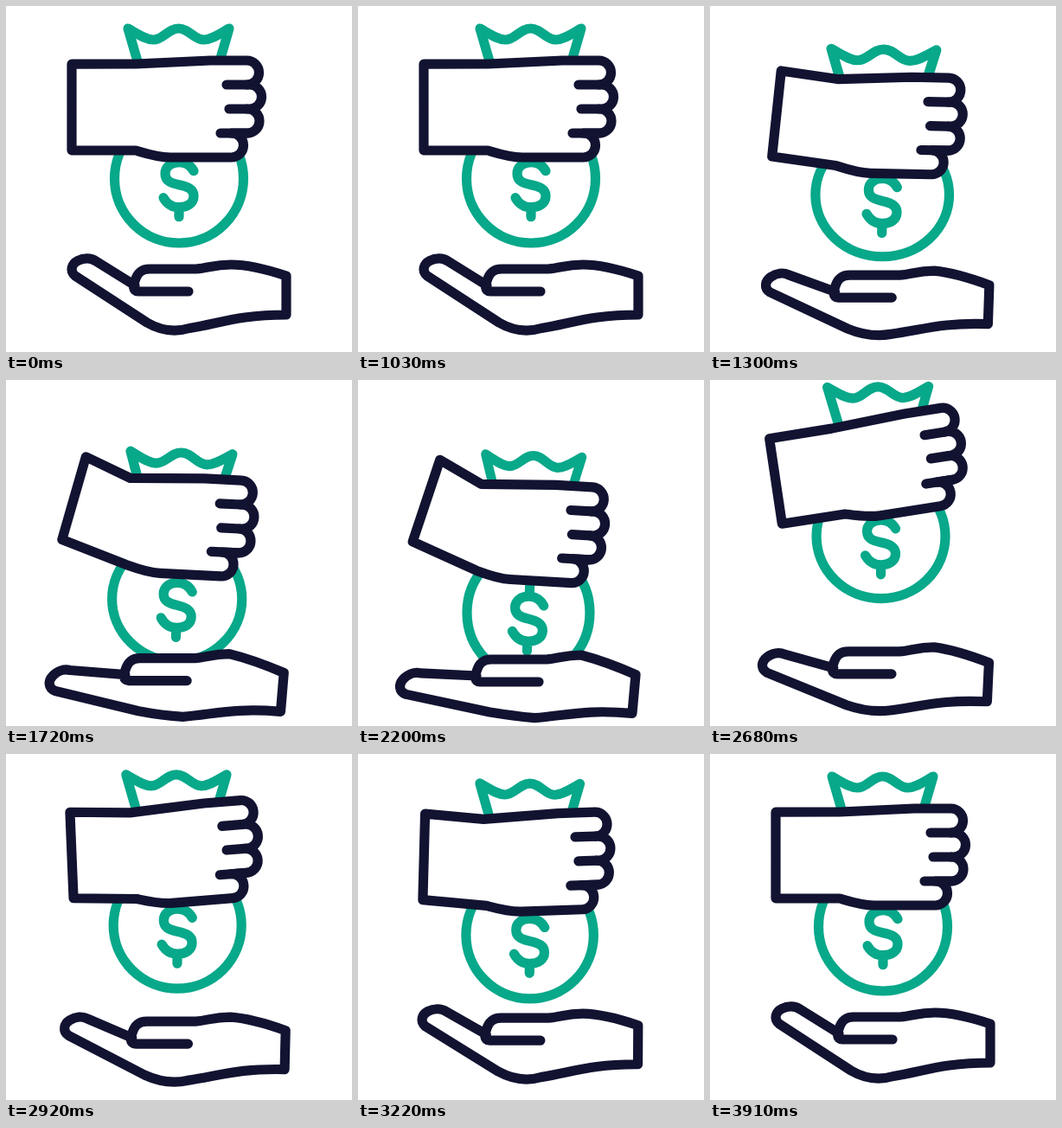
Recreate the animation shown at these times as an HTML page with a canvas. Size 400x400 px, loop 3940 ms.

```html
<!DOCTYPE html>
<html lang="en">
<head>
<meta charset="utf-8">
<title>Money handover</title>
<style>
  html, body { margin: 0; width: 100%; height: 100%; overflow: hidden; background: #fff; }
  canvas { display: block; width: 100vw; height: 100vh; }
</style>
</head>
<body>
<canvas id="stage"></canvas>
<script>
const LOOP = 3940, STEP = 30;
const DROP = 1030, RAISE = 2200, TOP = 2660, DIP = 3220, REST = 3700;
const DARK = '#121331', GREEN = '#08a88a', BAG_R = 74.5;
const canvas = document.getElementById('stage');
const ctx = canvas.getContext('2d');
const ratio = window.devicePixelRatio || 1;
canvas.width = canvas.height = 400 * ratio;

const CROWN = new Path2D('M-46 43L-58.5 0C-46 7 -38 13 -29 13C-18 13 -12 0 0 0' +
  'C12 0 18 13 29 13C38 13 46 7 58.5 0L46 43');
const DOLLAR = new Path2D('M17 -16C13 -23 7 -26 0 -26C-10 -26 -16 -20 -16 -13C-16 -4 -9 -2 0 0' +
  'C10 2 17 5 17 13C17 21 10 26 0 26C-8 26 -14 22 -18 15M0 26V37M0 -26V-40');

// Ease in and out, with a brisk start.
function ease(t, start, duration) {
  const s = Math.min(1, Math.max(0, (t - start) / duration));
  return (1 - Math.cos(Math.PI * s ** 0.72)) / 2;
}

// Amounts of the pressed and the lifted pose; the dip on the way back mixes both.
function weights(t, dropTime) {
  const up = ease(t, RAISE, TOP - RAISE);
  const down = ease(t, TOP, DIP - TOP);
  const settle = ease(t, DIP, REST - DIP);
  return {
    press: ease(t, DROP, dropTime) - up + 0.22 * (down - settle),
    lift: up - 0.71 * down - 0.29 * settle
  };
}

// Poses are [x, y, angle]; press and lift are offsets from rest.
function blend(w, rest, press, lift) {
  return rest.map((v, i) => v + w.press * press[i] + w.lift * lift[i]);
}

function within([x, y, angle], draw) {
  ctx.save();
  ctx.translate(x, y);
  ctx.rotate(angle * Math.PI / 180);
  draw();
  ctx.restore();
}

function drawBag(t) {
  const w = weights(t, 1170);
  const [x, y, tilt] = blend(w, [200, 199.5, 0], [-3, 69.5, 2.5], [-2.5, -19.5, 0]);
  const crown = blend(weights(t, 870), [199.5, 26, 0], [3.7, 61.5, 1.8], [-5.5, -18.7, -0.5]);
  const squash = Math.sin(Math.PI * ease(t, DROP, 1170));
  const rx = BAG_R + 5 * squash - 3.5 * w.press;
  const ry = BAG_R - 4 * squash - 2.5 * w.lift;

  ctx.strokeStyle = GREEN;
  within(crown, () => {
    ctx.scale(rx / BAG_R, 1);
    ctx.stroke(CROWN);
  });
  ctx.beginPath();
  ctx.ellipse(x, y, rx, ry, 0, 0, 2 * Math.PI);
  ctx.stroke();
  within([x, y + 7.2, tilt], () => ctx.stroke(DOLLAR));
}

function knuckle(x, y) {
  ctx.arc(x, y + 14, 14, -Math.PI / 2, Math.PI / 2);
}

function drawFist(t) {
  const fist = blend(weights(t, 1000), [255, 91, 0], [-9, 59.5, 3.4], [-7, -28, -9]);
  const drop = fist[1] - 91, sink = Math.max(0, drop);
  const sleeve = [76 + 0.05 * sink, 117 + 0.38 * sink, 0.31 * drop];

  ctx.strokeStyle = DARK;
  ctx.beginPath();
  within(fist, () => {
    ctx.moveTo(-105, -24);
    ctx.lineTo(-19, -28);
    knuckle(23.5, -28);
    knuckle(26.5, 0);
    knuckle(24, 28);
    knuckle(5.5, 56);
    ctx.lineTo(-65, 84);
    ctx.bezierCurveTo(-80, 84, -95, 79, -105, 76);
  });
  within(sleeve, () => {
    ctx.lineTo(0, 49.8);
    ctx.lineTo(0, -49.8);
  });
  ctx.closePath();
  ctx.fill();
  ctx.stroke();

  ctx.beginPath();
  within(fist, () => {
    [0, 3, -7].forEach((x, i) => {
      ctx.moveTo(24, 28 * i);
      ctx.lineTo(x, 28 * i);
    });
  });
  ctx.stroke();
}

// The open hand flattens: its parts shift, its fingers and wrist also turn.
function drawPalm(t) {
  const u = ease(t, DROP, 900) - ease(t, RAISE, 1300);
  const palm = [-2 * u, 19 * u, 0];
  const thumb = [-12 * u, 19 * u, 0];
  const wrist = [324 - 5 * u, 334.5 + 28.5 * u, 5.2 * u];
  const fingers = [156 - 18 * u, 344 + 22 * u, -21 * u];

  ctx.strokeStyle = DARK;
  ctx.beginPath();
  within(palm, () => ctx.moveTo(211, 330));
  within(thumb, () => {
    ctx.lineTo(153, 330);
    ctx.bezierCurveTo(146, 330, 147, 322, 149, 318);
    ctx.bezierCurveTo(152, 308, 157, 304, 166, 304);
  });
  within(palm, () => {
    ctx.lineTo(220, 304);
    ctx.bezierCurveTo(234, 303, 240, 299, 260, 299);
  });
  within(wrist, () => {
    ctx.bezierCurveTo(-42, -35.5, -21, -29.5, 0, -22.5);
    ctx.lineTo(0, 22.5);
    ctx.bezierCurveTo(-54, 22.5, -74, 31.5, -112, 38);
  });
  within(fingers, () => {
    ctx.quadraticCurveTo(31, 36, 7, 22);
    ctx.lineTo(-76, -32);
    ctx.bezierCurveTo(-83, -38, -80, -46, -73, -49.5);
    ctx.bezierCurveTo(-66, -53, -58, -53, -52, -49);
  });
  within(thumb, () => ctx.lineTo(149, 323));
  ctx.fill();
  ctx.stroke();
}

function render() {
  const now = performance.now() % LOOP;
  const t = DROP + Math.floor((now - DROP) / STEP) * STEP;
  ctx.setTransform(ratio, 0, 0, ratio, 0, 0);
  ctx.fillStyle = '#fff';
  ctx.fillRect(0, 0, 400, 400);
  ctx.lineWidth = 11.2;
  ctx.lineCap = ctx.lineJoin = 'round';
  drawBag(t);
  drawFist(t);
  drawPalm(t);
  requestAnimationFrame(render);
}
render();
</script>
</body>
</html>
```
